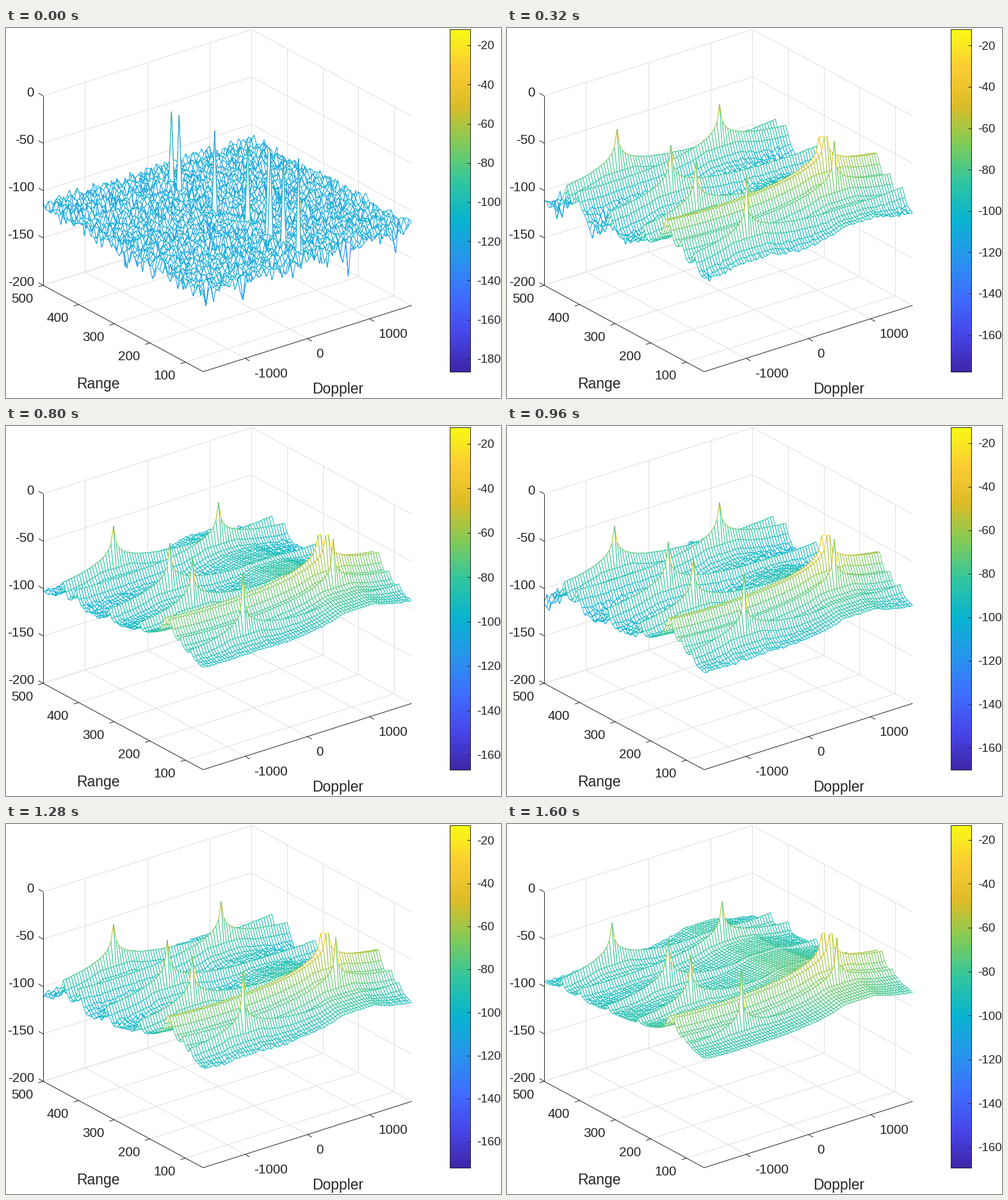
Recreate the animation shown at these times as a matplotlib script. Size 773 by 578 pixels, loop 1680 ms.

```python
import numpy as np
import matplotlib.pyplot as plt
from matplotlib.animation import FuncAnimation
from matplotlib.collections import PolyCollection
from matplotlib.colors import LinearSegmentedColormap

W, H, DPI = 773, 578, 64
PX = 72 / DPI                      # points per pixel
FRAMES, STEP = 21, 80
ROWS, COLS = 64, 80                # range rows and Doppler columns
BAR = (693, 725, 537, 2)           # colour bar: left, right, bottom, top
INK = "#262626"
GRID = "#dfdfdf"

CMAP = LinearSegmentedColormap.from_list("dusk", [
    (0 / 9, (.242, .150, .660)), (1 / 9, (.280, .278, .922)),
    (2 / 9, (.244, .436, .999)), (3 / 9, (.154, .590, .922)),
    (4 / 9, (.030, .708, .816)), (5 / 9, (.194, .776, .625)),
    (6 / 9, (.504, .799, .348)), (7 / 9, (.863, .741, .160)),
    (8 / 9, (.990, .800, .200)), (1, (.977, .984, .081))])

# starting row, Doppler column, leakage in dB
TARGETS = [(9.48, 19, 18), (11.53, 54, 18), (26.45, 23, 24), (39.45, 20, 26),
           (46.65, 58.5, 11), (47.72, 59.5, 11), (52.57, 58, 28), (59.45, 20, 40)]


def amp(db):
    return 10 ** (np.asarray(db) / 20)


def limits(n):
    """Lowest and highest level of the colour scale."""
    lo = np.interp(n, [0, 1, 7, 10, 14, 20],
                   [-186.5, -177.7, -177.7, -166.6, -173.6, -169.3])
    return lo, -11.8 - .075 * n


def loudness(row):
    """Echo level, which fades with range."""
    reach = 500 - 450 * row / (ROWS - 1)
    return -16 - 13.5 * np.log(reach / 78)


def roll_off(n):
    """Decay of the skirts, slowest when targets sit between two rows."""
    gap = min(n % 10, 10 - n % 10)
    return 1.7 - .025 * n - .35 * np.exp(-gap)


def surface(n):
    """Level in dB for every range row and Doppler column."""
    rows, cols = np.arange(ROWS), np.arange(COLS)
    power = np.zeros((ROWS, COLS))
    for start, col, leak in TARGETS:
        if n == 0:                 # all at rest, no leakage yet
            row = round(start)
            power[row, COLS // 2] += amp(loudness(row)) ** 2
            continue
        drift = .4 * (col / COLS - .5)
        row = round(start + drift * n + .85 * (drift > 0))
        off = np.abs(COLS / np.pi * np.sin(np.pi * (cols - col) / COLS))
        ridge = amp(-leak) / np.maximum(off, .5)
        skirt = np.minimum(ridge, amp(-leak) / 6)
        ridge[np.abs(cols - col) < .6] = 1
        dist = np.abs(rows - row)
        spread = amp(-9) * np.maximum(dist, 1) ** -roll_off(n)
        level = amp(loudness(row))
        power += np.outer(level * spread, skirt) ** 2
        power[row] += (level * ridge) ** 2
    rng = np.random.default_rng(100 + n)
    re, im = rng.normal(size=(2, ROWS, COLS)) * amp(-114) / np.sqrt(2)
    z = 20 * np.log10(np.hypot(np.sqrt(power) + re, im))
    return np.maximum(z, limits(n)[0])


def project(s, u, z):
    """Range fraction (back to front), Doppler fraction and dB to pixels."""
    return (58 + 250 * s + 325.5 * u,
            402 + 135 * s - 103.5 * u - 1.48 * (z + 200))


def mesh(z, lo, hi):
    """Cells from back to front: a white face, then its edges."""
    s, u = np.mgrid[0:1:ROWS * 1j, 0:1:COLS * 1j]
    p = np.stack(project(s, u, z), -1)
    c = CMAP((z - lo) / (hi - lo))
    bl, br, fl, fr = p[:-1, :-1], p[:-1, 1:], p[1:, :-1], p[1:, 1:]
    parts = [(bl, br, fr, fl), (bl, br, br, br), (br, fr, fr, fr), (bl, fl, fr, fr)]
    verts = np.stack([np.stack(q, 2) for q in parts], 2)
    cols = np.stack([c[:-1, :-1], c[:-1, :-1], c[1:, 1:], c[1:, :-1]], 2)
    return verts[:, ::-1].reshape(-1, 4, 2), cols[:, ::-1].reshape(-1, 4)


fig = plt.figure(figsize=(W / DPI, H / DPI), dpi=DPI, facecolor="white")
ax = fig.add_axes([0, 0, 1, 1])


def line(a, b, color=INK, z=5):
    return ax.plot([a[0], b[0]], [a[1], b[1]], color=color, lw=PX,
                   zorder=z, solid_capstyle="butt")[0]


def label(x, y, text, size=20.8, ha="center"):
    """Text whose digits are centred on y."""
    return ax.text(x, y + .34 * size, text, fontsize=size * PX, color=INK,
                   family="Liberation Sans", ha=ha, va="baseline", zorder=6)


def draw_axes():
    for z in range(-200, 1, 50):
        line(project(0, 0, z), project(0, 1, z), GRID, 1)
        line(project(0, 1, z), project(1, 1, z), GRID, 1)
        x, y = project(0, 0, z)
        line((x, y), (x - 7, y - 4))
        label(44, y - 6, str(z), ha="right")
    for r in range(100, 501, 100):
        s = (500 - r) / 450
        line(project(s, 0, -200), project(s, 1, -200), GRID, 1)
        line(project(s, 1, -200), project(s, 1, 0), GRID, 1)
        x, y = project(s, 0, -200)
        line((x, y), (x - 7.5, y + 2.4))
        label(x - 15.5, y + 20, str(r), ha="right")
    for d in (-1000, 0, 1000):
        u = .5 + d / 3350
        line(project(0, u, -200), project(1, u, -200), GRID, 1)
        line(project(0, u, -200), project(0, u, 0), GRID, 1)
        x, y = project(1, u, -200)
        line((x, y), (x + 7, y + 4))
        label(x + 14, y + 23, str(d), ha="left")
    corner = project(1, 0, -200)
    line(project(0, 0, 0), project(0, 0, -200))
    line(project(0, 0, -200), corner)
    line(corner, project(1, 1, -200))
    label(143.5, 555, "Range", 22.9)
    label(518, 563, "Doppler", 22.9)


draw_axes()
ax.imshow(np.linspace(1, 0, 256)[:, None], cmap=CMAP, aspect="auto",
          extent=BAR, interpolation="nearest", zorder=3)
ax.add_patch(plt.Rectangle((BAR[0], BAR[3]), BAR[1] - BAR[0], BAR[2] - BAR[3],
                           fill=False, ec=INK, lw=PX, zorder=4))
ticks = [(v, line((720, 0), (725, 0)), label(735, 0, str(v), 18.7, "left"))
         for v in range(-20, -181, -20)]

CLEAR = (1, 1, 1, 0)
net = PolyCollection([], closed=False, facecolors=["white", CLEAR, CLEAR, CLEAR],
                     linewidths=[0, PX, PX, PX], joinstyle="bevel", zorder=2)
ax.add_collection(net, autolim=False)
ax.set_xlim(.1, W + .1)
ax.set_ylim(H + .1, .1)
ax.axis("off")


def update(n):
    lo, hi = limits(n)
    verts, cols = mesh(surface(n), lo, hi)
    net.set_verts(verts, closed=False)
    net.set_edgecolor(cols)
    for v, mark, text in ticks:
        y = BAR[3] + (hi - v) / (hi - lo) * (BAR[2] - BAR[3])
        mark.set_ydata([y, y])
        text.set_y(y + .34 * 18.7)
        mark.set_visible(v > lo)
        text.set_visible(v > lo)
    return [net]


anim = FuncAnimation(fig, update, frames=FRAMES, interval=STEP,
                     repeat=True, repeat_delay=0, blit=False)
plt.show()
```
